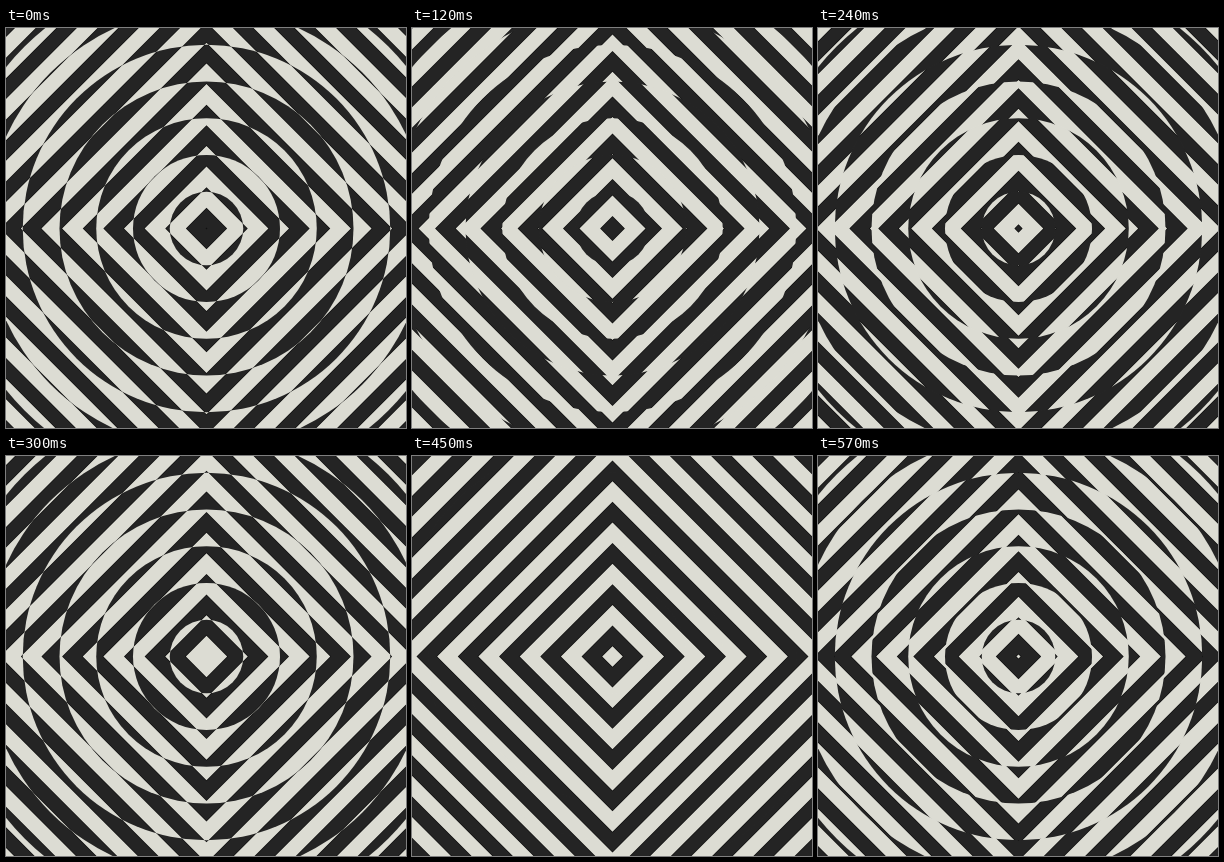
An HTML page with a canvas that plays this animation: 400x400 px, repeating every 0.6 s.

```html
<!DOCTYPE html>
<html lang="en">
<head>
<meta charset="utf-8">
<title>Counter-moving diamonds</title>
<style>
  html, body { margin: 0; width: 100%; height: 100%; overflow: hidden; background: #dcdcd3; }
  canvas { display: block; width: 400px; height: 400px; }
</style>
</head>
<body>
<canvas id="stage" width="400" height="400"></canvas>
<script>
const DARK = '#242424', EDGE = '#101010', LIGHT = '#dcdcd3';
const SIZE = 400, CENTER = 200.5;
const LOOP = 600, STEP = 30;
const RING = 36.75;         // width of each circular ring
const BAND = 20.63;         // thickness of a stripe along the axes
const PERIOD = 2 * BAND;
const RINGS = 8;

const ctx = document.getElementById('stage').getContext('2d');
const inward = layer(), outward = layer();

function layer() {
  const canvas = document.createElement('canvas');
  canvas.width = canvas.height = SIZE;
  return canvas.getContext('2d');
}

function diamond(c, r) {
  if (r <= 0) return;
  c.moveTo(CENTER, CENTER - r);
  c.lineTo(CENTER + r, CENTER);
  c.lineTo(CENTER, CENTER + r);
  c.lineTo(CENTER - r, CENTER);
  c.closePath();
}

function bands(c, shift, inset, color) {
  c.beginPath();
  for (let r = shift - PERIOD; r < SIZE + PERIOD; r += PERIOD) {
    diamond(c, r + inset);
    diamond(c, r + BAND - inset);
  }
  c.fillStyle = color;
  c.fill('evenodd');
}

function stripes(c, shift) {
  c.fillStyle = LIGHT;
  c.fillRect(0, 0, SIZE, SIZE);
  bands(c, shift, 0, EDGE);
  bands(c, shift, 1, DARK);
  return ctx.createPattern(c.canvas, 'no-repeat');
}

// Even rings flow inward, odd rings outward; paint from the outside in.
function draw(p) {
  const fills = [
    stripes(inward, -p * PERIOD),
    stripes(outward, p * PERIOD - BAND)
  ];
  for (let i = RINGS - 1; i >= 0; i--) {
    ctx.beginPath();
    ctx.arc(CENTER, CENTER, (i + 1) * RING, 0, 2 * Math.PI);
    ctx.fillStyle = fills[i % 2];
    ctx.fill();
  }
}

const start = performance.now();
function tick() {
  const t = (performance.now() - start) % LOOP;
  draw(Math.floor(t / STEP) * STEP / LOOP);
  requestAnimationFrame(tick);
}
tick();
</script>
</body>
</html>
```
